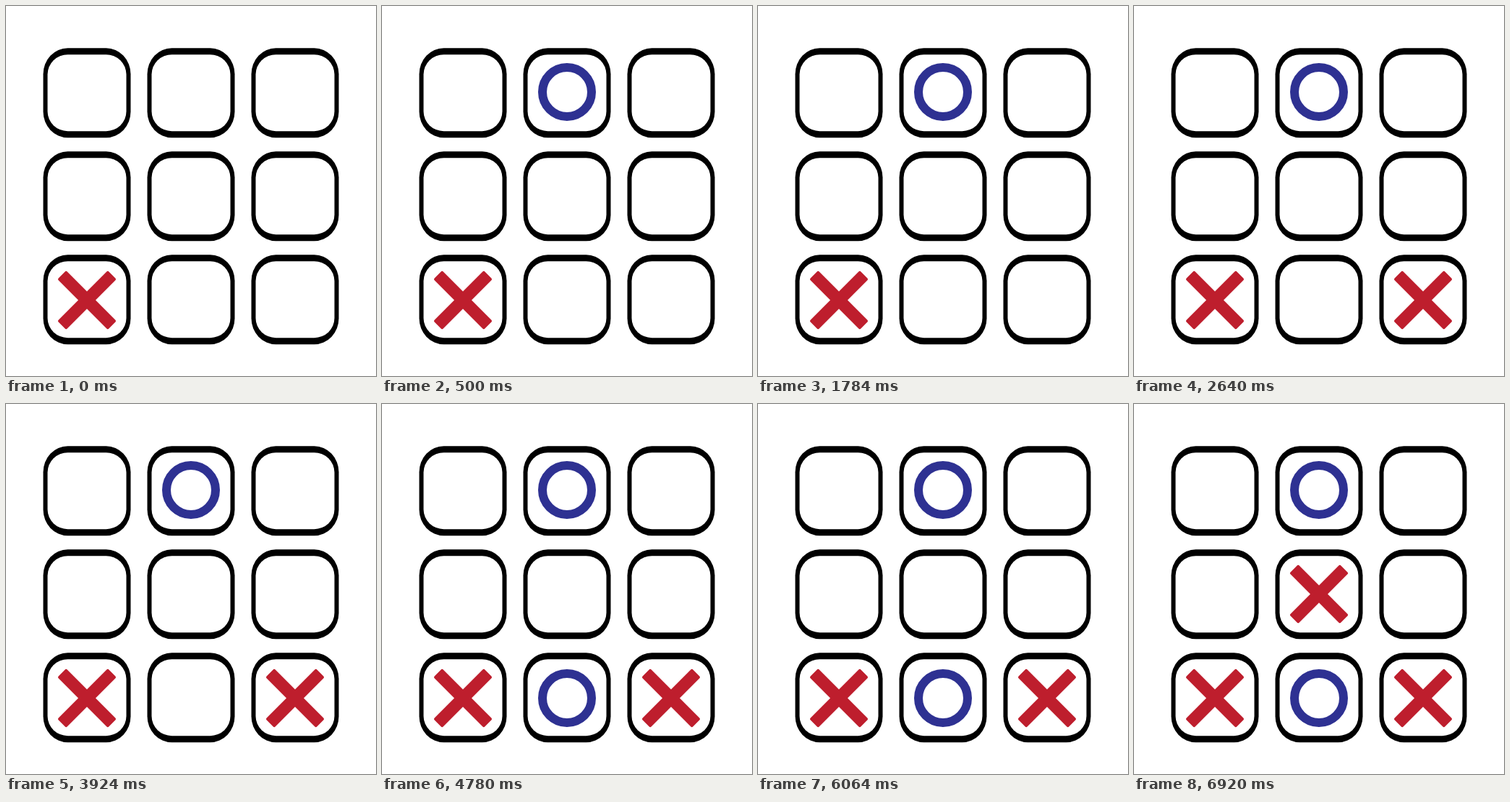
Animation of 512x512 px, one loop 8000 ms. Source, as an HTML page:

```html
<!DOCTYPE html>
<html lang="en">
<head>
<meta charset="utf-8">
<title>Noughts and crosses</title>
<style>
  html, body { margin: 0; width: 100%; height: 100%; overflow: hidden; background: #fff; }
  svg { display: block; width: 100%; height: 100%; }
</style>
</head>
<body>
<svg viewBox="0 0 512 512">
  <defs>
    <g id="cell">
      <rect x="-60.5" y="-62" width="121" height="124" rx="34" ry="36"/>
      <rect x="-54.5" y="-53" width="109" height="106" rx="28" ry="27.5" fill="#fff"/>
    </g>
    <g id="cross" fill="#be1e2d">
      <rect x="-49.25" y="-8.5" width="98.5" height="17" rx="2" transform="rotate(45)"/>
      <rect x="-49.25" y="-8.5" width="98.5" height="17" rx="2" transform="rotate(-45)"/>
    </g>
    <circle id="nought" r="34" fill="none" stroke="#2e3192" stroke-width="12"/>
  </defs>
</svg>
<script>
const LOOP = 8000;
const svg = document.querySelector('svg');

function place(id, x, y) {
  const use = document.createElementNS('http://www.w3.org/2000/svg', 'use');
  use.setAttribute('href', '#' + id);
  use.setAttribute('x', x);
  use.setAttribute('y', y);
  return svg.appendChild(use);
}

for (let row = 0; row < 3; row++)
  for (let col = 0; col < 3; col++)
    place('cell', 112 + 144 * col, 120.2 + 143 * row);

// Each move: time in ms, mark, column, row
const moves = [
  [0, 'cross', 0, 2],
  [500, 'nought', 1, 0],
  [2640, 'cross', 2, 2],
  [4780, 'nought', 1, 2],
  [6920, 'cross', 1, 1]
].map(([at, mark, col, row]) => ({
  at, node: place(mark, 112 + 144 * col, 119 + 144 * row)
}));

const start = performance.now();

function draw(now) {
  const t = Math.max(0, now - start) % LOOP;
  for (const { at, node } of moves)
    node.setAttribute('visibility', t >= at ? 'visible' : 'hidden');
  requestAnimationFrame(draw);
}
draw(start);
</script>
</body>
</html>
```
